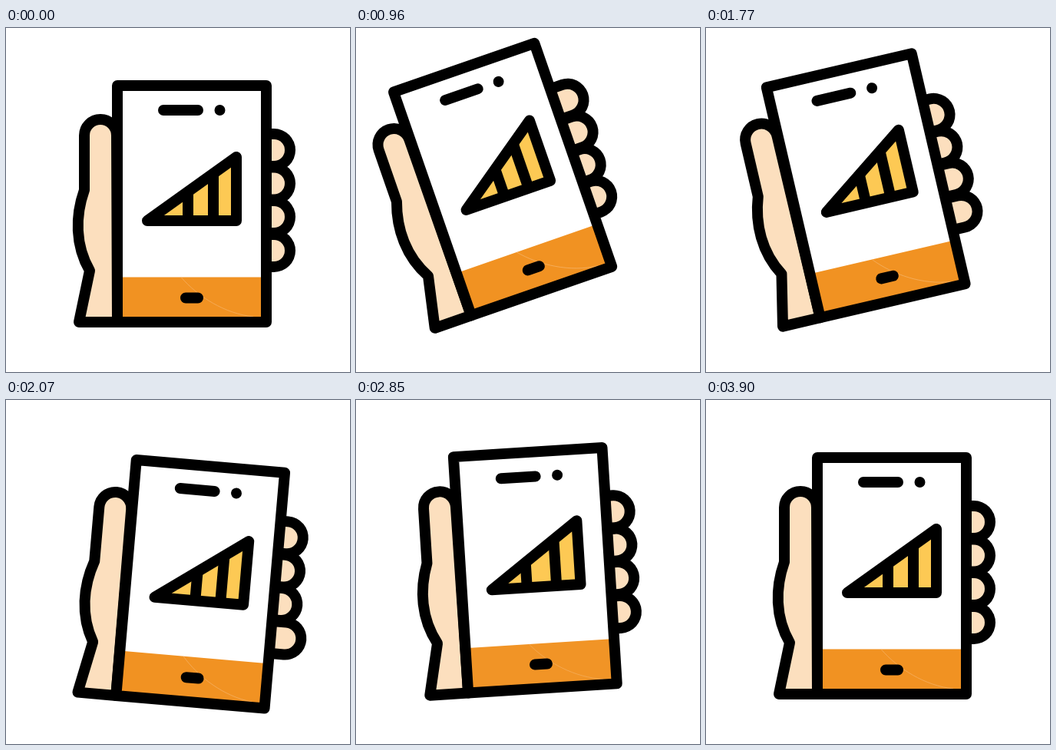
An HTML page that plays this animation: 448 px wide and 448 px high, repeating every 4230 ms.

```html
<!DOCTYPE html>
<html lang="en">
<head>
<meta charset="utf-8">
<title>Phone in hand</title>
<style>
  html, body { margin: 0; width: 100%; height: 100%; overflow: hidden; background: #fff; }
  svg { display: block; width: 100vw; height: 100vh; }
  .ink { stroke: #000; stroke-width: 14; stroke-linecap: round; stroke-linejoin: round; }
  .skin { fill: #fcdfbe; }
  #outlines { stroke: #000; stroke-width: 56; stroke-linecap: round; }
  #fills { stroke: #fcdfbe; stroke-width: 28; stroke-linecap: round; }
</style>
</head>
<body>
<svg viewBox="0 0 448 448">
  <clipPath id="wedge"><path d="M184 251 300 168V251Z"/></clipPath>
  <g id="device">
    <g id="outlines"></g>
    <g id="fills"></g>
    <path class="ink skin" d="M144 140A21 21 0 0 0 102 140V211C90 245 90 283 109 316L95 383H145Z"/>
    <path fill="#fff" d="M145 75H339V383H145Z"/>
    <path id="panel" d="M145 324.5H339V383H145Z"/>
    <path id="seam" fill="none" stroke="#f6b469" stroke-width=".7" d="M228 324.5C250 350 285 372 322 376"/>
    <path class="ink" fill="none" d="M145 75H339V383H145ZM205 107H250M278.500 107h.01M234 351.500H250"/>
    <path fill="#fdc954" d="M184 251 300 168V251Z"/>
    <g clip-path="url(#wedge)">
      <path id="bars" class="ink" d="M165.500 150V260M198.500 150V260M237 150V260M270 150V260"/>
    </g>
    <path class="ink" fill="none" d="M184 251 300 168V251Z"/>
  </g>
</svg>
<script>
const LOOP = 4230, STEP = 30;
const $ = id => document.getElementById(id);
const clamp = v => Math.min(1, Math.max(0, v));
const ease = u => (1 - Math.cos(Math.PI * clamp(u))) / 2;
const bump = (t, peak, half) => ease(1 - Math.abs(t - peak) / half);

// Swings after the first tilt: [time, angle]
const swings = [[1500, -20.6], [2400, 15.7], [3000, -6.9], [3450, 3.2], [3900, 0]];

function tilt(t) {
  if (t < 1500) return -20.7 * (1 - Math.exp(-0.0041 * Math.max(0, t - 330)));
  let angle = swings[0][1];
  for (let i = 1; i < swings.length; i++) {
    const [t0, a0] = swings[i - 1], [t1, a1] = swings[i];
    angle += (a1 - a0) * ease((t - t0) / (t1 - t0));
  }
  return angle;
}

const fingers = [159, 202.5, 246, 290].map(y =>
  ['outlines', 'fills'].map(id => {
    const line = document.createElementNS('http://www.w3.org/2000/svg', 'line');
    const ends = { x1: 330, y1: y, x2: 349, y2: y };
    for (const key in ends) line.setAttribute(key, ends[key]);
    return $(id).appendChild(line);
  }));

function draw(now) {
  const t = Math.floor(now % LOOP / STEP) * STEP;
  $('device').setAttribute('transform', `rotate(${tilt(t)} 122 364)`);
  $('bars').setAttribute('transform', `translate(${71.5 * clamp((t - 2400) / 1020)})`);
  fingers.forEach((pair, i) => {
    const x = 349 + 12 * bump(t, 790 + 385 * i, 365);
    pair.forEach(line => line.setAttribute('x2', x));
  });
  const glow = bump(t, 3180, 450);
  $('panel').setAttribute('fill', `rgb(${241 + 3 * glow},${146 + 10 * glow},${34 + 22 * glow})`);
  $('seam').setAttribute('opacity', 1 - 0.8 * glow);
}

let start;
function tick(now) {
  start ??= now;
  draw(now - start);
  requestAnimationFrame(tick);
}
draw(0);
requestAnimationFrame(tick);
</script>
</body>
</html>
```
